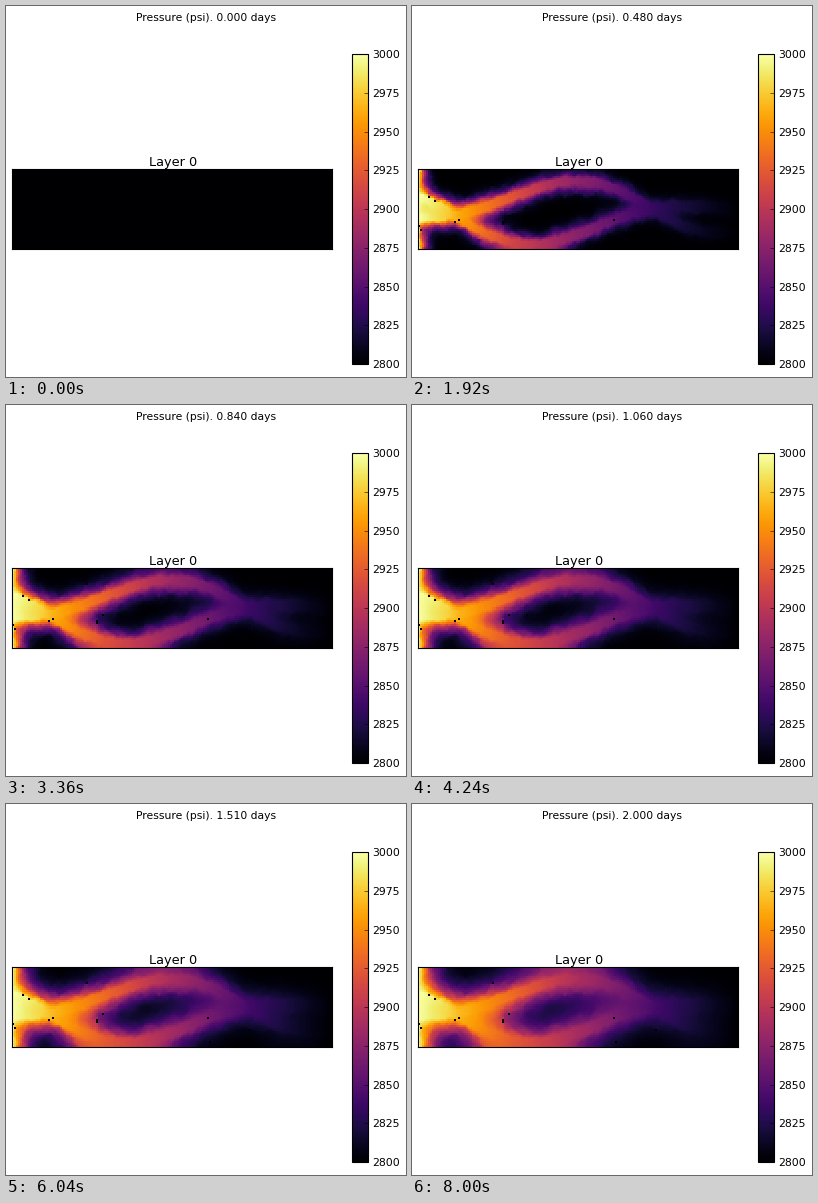
A matplotlib script that plays this animation: 400x371 px, repeating every 8040 ms.

```python
import numpy as np
import matplotlib.pyplot as plt
from matplotlib.animation import FuncAnimation

W, H, DPI = 400, 371, 80
FRAMES, STEP_MS = 201, 40
NX, NY, CELL = 160, 40, 2
P_IN, P_OUT = 3000, 2800
DAYS_PER_FRAME, SUBSTEPS = 0.01, 2
ROCK, CHANNEL, HALF_WIDTH = 18, 38000, 1.85
SEALED = 13

plt.rcParams["font.family"] = "DejaVu Sans"


def wave(x, mean, size, peak, length):
    return mean + size * np.cos(2 * np.pi * (x - peak) / length)


def diffusivity():
    """Noisy rock crossed by two winding, highly conductive channels."""
    rng = np.random.default_rng(8)
    noise = rng.standard_normal((NY, NX))
    k = ROCK * np.exp(noise)

    x, y = np.arange(NX) + 0.5, np.arange(NY)[:, None] + 0.5
    middle = wave(x, 21.9, 4, 40.2, 112.5)
    spread = wave(x, 4, 10.25, 67.2, 157.5)
    inside = abs(abs(y - middle) - abs(spread)) < HALF_WIDTH
    k[inside] = CHANNEL * np.exp(0.3 * noise[inside])

    # a few sealed cells never fill
    k.flat[rng.choice(k.size, SEALED, replace=False)] = 1e-3
    return k


def harmonic(a, b):
    return 2 * a * b / (a + b)


def simulate():
    """Implicit diffusion, solved column by column (block tridiagonal)."""
    dt = DAYS_PER_FRAME / SUBSTEPS
    k = diffusivity()
    tx = dt * harmonic(k[:, 1:], k[:, :-1])
    ty = dt * harmonic(k[1:], k[:-1])
    inlet, outlet = 2 * dt * k[:, 0], 2 * dt * k[:, -1]

    diag = np.ones((NY, NX))
    diag[:, 1:] += tx
    diag[:, :-1] += tx
    diag[1:] += ty
    diag[:-1] += ty
    diag[:, 0] += inlet
    diag[:, -1] += outlet

    inv = []
    for j in range(NX):
        block = np.diag(diag[:, j]) - np.diag(ty[:, j], 1) - np.diag(ty[:, j], -1)
        if j:
            c = tx[:, j - 1]
            block -= c[:, None] * inv[-1] * c
        inv.append(np.linalg.inv(block))

    coupling = tx.T.copy()
    p = np.zeros((NX, NY))
    fields = [p.T + P_OUT]
    for _ in range(FRAMES - 1):
        for _ in range(SUBSTEPS):
            rhs = p.copy()
            rhs[0] += inlet * (P_IN - P_OUT)
            for j in range(1, NX):
                rhs[j] += coupling[j - 1] * (inv[j - 1] @ rhs[j - 1])
            p = np.empty_like(rhs)
            p[-1] = inv[-1] @ rhs[-1]
            for j in range(NX - 2, -1, -1):
                p[j] = inv[j] @ (rhs[j] + coupling[j] * p[j + 1])
        fields.append(p.T + P_OUT)
    return fields


def add_axes(x, y, w, h):
    return fig.add_axes([x / W, 1 - (y + h) / H, w / W, h / H])


def add_text(x, y, text, size):
    return fig.text(x / W, 1 - y / H, text, size=size, ha="center", va="baseline")


fields = simulate()

fig = plt.figure(figsize=(W / DPI, H / DPI), dpi=DPI, facecolor="white")
ax = add_axes(6, 162.8, NX * CELL + 0.3, NY * CELL + 0.3)
image = ax.imshow(fields[0], cmap="inferno", vmin=P_OUT, vmax=P_IN,
                  aspect="auto", interpolation="nearest")
ax.set(xticks=[], yticks=[])

bar = fig.colorbar(image, cax=add_axes(346.2, 48.2, 16, 310),
                   ticks=range(P_OUT, P_IN + 1, 25), format="%d")
for line in [*ax.spines.values(), bar.outline]:
    line.set_linewidth(1)
bar.ax.tick_params(direction="in", length=4, width=0.5, pad=3.3, labelsize=9.8)

add_text(167, 160.2, "Layer 0", 11.6)
heading = add_text(200.5, 15, "", 9.7)


def draw(i):
    image.set_data(fields[i])
    heading.set_text(f"Pressure (psi). {i * DAYS_PER_FRAME:.3f} days")
    return image, heading


anim = FuncAnimation(fig, draw, frames=FRAMES, interval=STEP_MS,
                     repeat=True, repeat_delay=0, blit=False)
plt.show()
```
